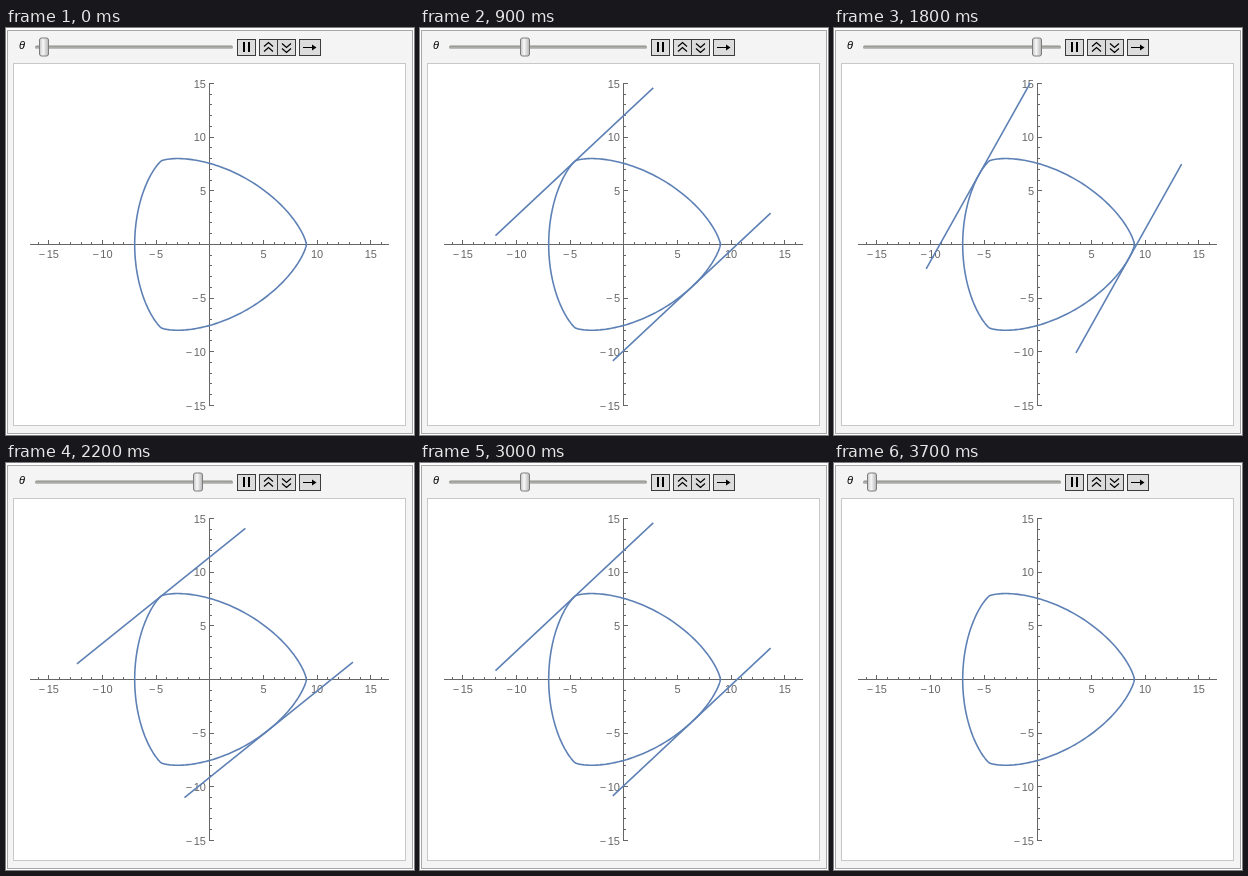
Recreate the animation shown at these times as an HTML page. Size 408x407 px, loop 4000 ms.

```html
<!DOCTYPE html>
<html lang="en">
<head>
<meta charset="utf-8">
<title>Curve of constant width</title>
<style>
  html, body { margin: 0; width: 100%; height: 100%; overflow: hidden; background: #fff; }
  svg { display: block; width: 100vw; height: 100vh; }
  text { font-family: "Liberation Sans", Arial, sans-serif; font-size: 11px; }
  .axes { stroke: #666; fill: none; }
  .labels { fill: #666; }
  .curve { stroke: #5e81b5; stroke-width: 1.6; fill: none; }
  .button { fill: #dcdcdc; stroke: #3c3c3c; }
  .icon { stroke: #000; fill: none; stroke-width: 1.2; }
</style>
</head>
<body>
<svg viewBox="0 0 408 407">
  <defs>
    <linearGradient id="metal">
      <stop offset="0" stop-color="#c4c4c4"/>
      <stop offset=".4" stop-color="#f8f8f8"/>
      <stop offset="1" stop-color="#b4b4b4"/>
    </linearGradient>
    <linearGradient id="groove" x2="0" y2="1">
      <stop offset="0" stop-color="#8c8c88"/>
      <stop offset="1" stop-color="#c4c4c0"/>
    </linearGradient>
    <clipPath id="range"><rect x="24" y="55" width="360" height="323"/></clipPath>
  </defs>

  <rect x="1.5" y="2.5" width="405" height="403" fill="#f4f4f4" stroke="#a8a8a8"/>
  <rect x="7.5" y="35.5" width="392" height="362" fill="#fff" stroke="#c8c8c8"/>

  <text x="13" y="21" font-style="italic">θ</text>
  <rect x="29" y="17.5" width="198" height="3.5" rx="1.5" fill="url(#groove)"/>
  <rect id="thumb" x="-4.5" y="10" width="9" height="18" rx="2" fill="url(#metal)" stroke="#7c7c7c"/>

  <g class="button">
    <rect x="231.5" y="11.5" width="18" height="16"/>
    <rect x="253.5" y="11.5" width="18" height="16"/>
    <rect x="271.5" y="11.5" width="18" height="16"/>
    <rect x="293.5" y="11.5" width="21" height="16"/>
  </g>
  <path d="M237 14h2v10h-2zM242 14h2v10h-2z"/>
  <path class="icon" d="M258 18.5l4.5-4 4.5 4M258 23.500l4.500-4 4.500 4M276 15.500l4.500 4 4.500-4M276 20.500l4.500 4 4.500-4M297 19.500h11"/>
  <path d="M306 16.500l4.500 3-4.500 3z"/>

  <path id="axes" class="axes"/>
  <g id="labels" class="labels"></g>
  <path id="shape" class="curve" stroke-linejoin="round"/>
  <path id="tangents" class="curve" stroke-linecap="square" clip-path="url(#range)"/>
</svg>
<script>
  const byId = id => document.getElementById(id);
  const UNIT = 10.73, RAD = Math.PI / 180;
  const px = x => 203.8 + UNIT * x;
  const py = y => 216.4 - UNIT * y;
  const at = (x, y) => px(x).toFixed(2) + ' ' + py(y).toFixed(2);

  // Boundary point whose outward normal has angle a; support function 8 + cos 3a.
  function boundary(a) {
    const h = 8 + Math.cos(3 * a), dh = -3 * Math.sin(3 * a);
    const c = Math.cos(a), s = Math.sin(a);
    return [h * c - dh * s, h * s + dh * c];
  }

  function tangent(a) {
    const [x, y] = boundary(a);
    const dx = -10 * Math.sin(a), dy = 10 * Math.cos(a);
    return `M${at(x - dx, y - dy)}L${at(x + dx, y + dy)}`;
  }

  function label(n, x, y, anchor) {
    const digits = Math.abs(n);
    const body = n < 0 ? `−<tspan dx="1.5">${digits}</tspan>` : digits;
    return `<text x="${x}" y="${y}" text-anchor="${anchor}">${body}</text>`;
  }

  function drawAxes() {
    const snap = v => Math.floor(v) + 0.5;
    let d = 'M24 216.5H383M203.5 55V378', text = '';
    for (let n = -16; n <= 16; n++) {
      if (!n) continue;
      const major = n % 5 === 0, size = major ? 4.5 : 2.5;
      d += `M${snap(px(n))} 216.5v${-size}`;
      if (Math.abs(n) < 16) d += `M203.5 ${snap(py(n))}h${size}`;
      if (major) {
        text += label(n, px(n), 230, 'middle');
        text += label(n, 200, py(n) + 4.2, 'end');
      }
    }
    byId('axes').setAttribute('d', d);
    byId('labels').innerHTML = text;
  }

  function drawShape() {
    const points = Array.from({ length: 360 }, (_, i) => at(...boundary(i * RAD)));
    byId('shape').setAttribute('d', `M${points.join('L')}Z`);
  }

  // Steps 0 to 17 and back, one each 100 ms, with a pause at both ends.
  function stepAt(ms) {
    const tick = Math.floor(ms / 100);
    return Math.max(0, tick < 20 ? Math.min(17, tick - 2) : Math.min(17, 37 - tick));
  }

  function draw(now) {
    const step = stepAt(now % 4000);
    const deg = step ? 1.36 + 21.96 * (step - 1) : 0;
    const a = deg * RAD;
    byId('thumb').setAttribute('transform', `translate(${Math.round(38.4 + 0.4975 * deg)})`);
    byId('tangents').setAttribute('d', step ? tangent(a) + tangent(a + Math.PI) : '');
  }

  drawAxes();
  drawShape();
  const start = performance.now();
  function loop() {
    draw(performance.now() - start);
    requestAnimationFrame(loop);
  }
  loop();
</script>
</body>
</html>
```
